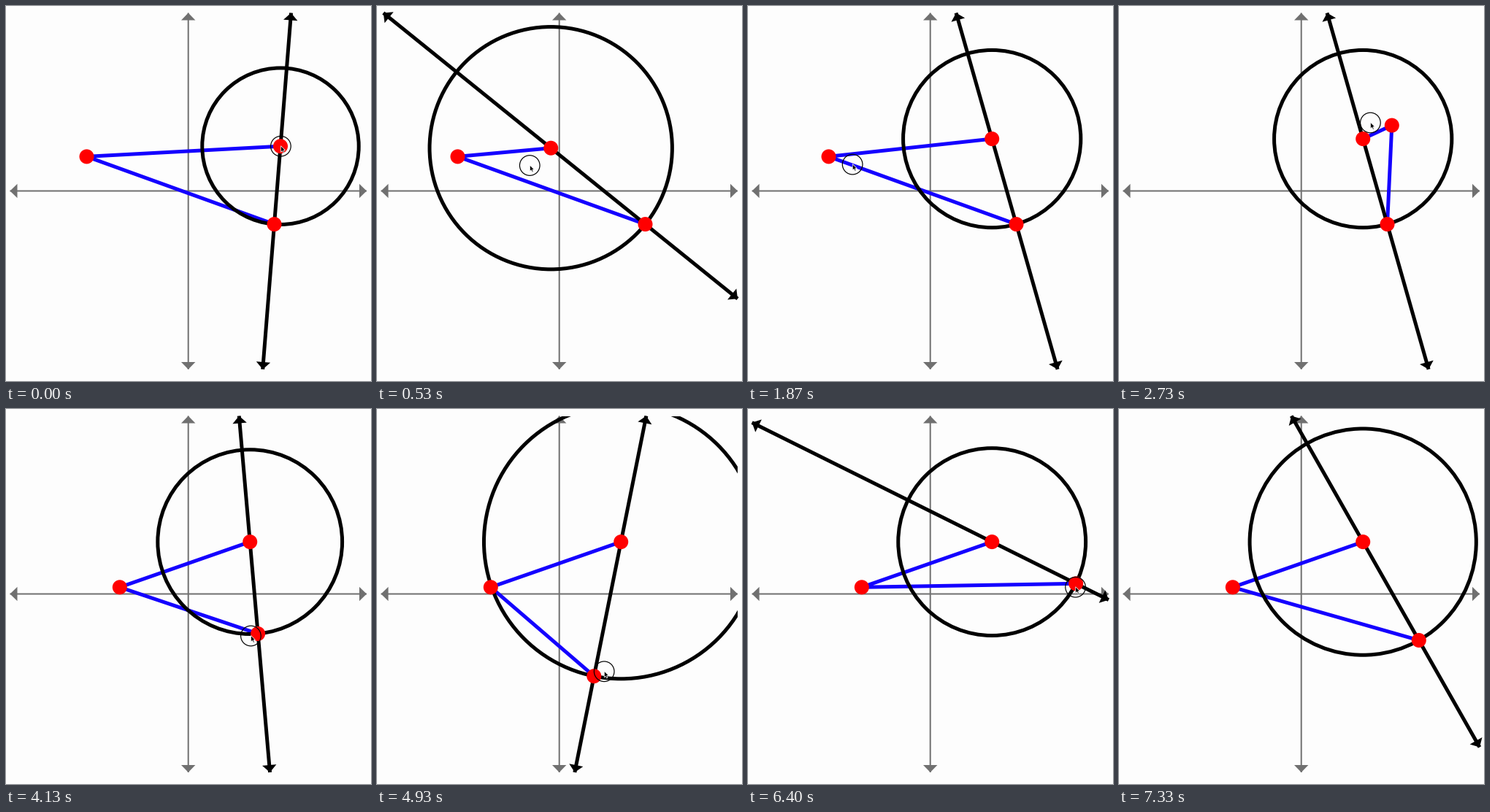
Animation of 500x514 px, one loop 7990 ms. Source, as a matplotlib script:

```python
import numpy as np
import matplotlib.pyplot as plt
from matplotlib.animation import FuncAnimation
from matplotlib.patches import Circle, Polygon, Rectangle

W, H, DPI = 500, 514, 100
LOOP_MS, FRAMES = 7990, 120
HIDE_AT = 110
LEFT, RIGHT, TOP, BOTTOM = 5.5, 494, 9.5, 498
ORIGIN = np.array([249.7, 253.5])
GREY, BLUE, RED, PAPER = "#707070", "#1400ff", "#ff0000", "#fdfdfd"

CENTER_DRAG, VERTEX_DRAG, RIM_DRAG = (2, 22), (27, 47), (54, 108)


class Hop:
    """Pointer move ending at (x, y): a straight run plus an elliptic detour."""

    def __init__(self, frame, x, y, bulge=(0, 0), spin=0.0):
        self.frame = frame
        self.end = np.array([x, y], float)
        self.bulge = np.array(bulge, float)
        self.swing = spin * np.array([-self.bulge[1], self.bulge[0]])

    def at(self, start, u):
        turn = 2 * np.pi * u
        return (start + (self.end - start) * u
                + self.bulge * (1 - np.cos(turn)) / 2
                + self.swing * np.sin(turn) / 2)


HOPS = [
    Hop(0, 376, 192.2),
    Hop(2, 376, 192.2),
    Hop(14, 342.1, 236.2, (-160, 30), 0.5),
    Hop(15, 346, 216),
    Hop(22, 334.2, 182.1, (-125, 20), 0.5),
    Hop(27, 110.5, 206.4),
    Hop(38, 465, 250, (0, 85)),
    Hop(40, 373.8, 163.6, (25, -10)),
    Hop(41, 344, 160),
    Hop(47, 155.8, 244.3, (-30, 150), 0.5),
    Hop(54, 367.5, 299.1),
    Hop(61, 345.1, 308, (40, 18), 0.5),
    Hop(62, 335, 311),
    Hop(68, 238, 331),
    Hop(69, 238, 331),
    Hop(80, 218, 338, (85, 20), 0.5),
    Hop(83, 239.1, 164.2, (-35, 0)),
    Hop(84, 239.8, 161),
    Hop(95, 449.2, 239.3, (20, -110), -0.5),
    Hop(96, 448.2, 244.2),
    Hop(104, 413, 311),
    Hop(108, 410.8, 317),
]


def pointer(t):
    for a, b in zip(HOPS, HOPS[1:]):
        if t <= b.frame:
            return b.at(a.end, (t - a.frame) / (b.frame - a.frame))
    return HOPS[-1].end


def dragged(frame, drag):
    """A dragged point trails the pointer by one frame."""
    return pointer(np.clip(frame - 1, *drag))


def line_ends(p, direction):
    """Where the line through p leaves the plot box."""
    ends = []
    for d in (direction, -direction):
        reach = []
        if abs(d[0]) > 1e-9:
            reach.append(((RIGHT if d[0] > 0 else LEFT) - p[0]) / d[0])
        if abs(d[1]) > 1e-9:
            reach.append(((BOTTOM if d[1] > 0 else TOP) - p[1]) / d[1])
        ends.append(p + d * min(reach))
    return ends


def arrowhead(tip, direction, length=10, half=9.7):
    d = direction / np.hypot(*direction)
    base = tip - d * length
    side = np.array([-d[1], d[0]]) * half
    return np.array([tip, base + side, base - side])


def px(width):
    return width * 72 / DPI


fig = plt.figure(figsize=(W / DPI, H / DPI), dpi=DPI, facecolor=PAPER)
ax = fig.add_axes([0, 0, 1, 1])
ax.set_xlim(0, W)
ax.set_ylim(H, 0)
ax.axis("off")


def stroke(color, width, z):
    return ax.plot([], [], color=color, lw=px(width), zorder=z, snap=False,
                   solid_capstyle="butt", solid_joinstyle="round")[0]


def head(color, z):
    return ax.add_patch(Polygon(np.zeros((3, 2)), fc=color, ec="none", zorder=z))


def place_arrow(line, heads, p, d):
    ends = line_ends(p, d)
    line.set_data(*np.array(ends).T)
    for tip, tip_head, sign in zip(ends, heads, (1, -1)):
        tip_head.set_xy(arrowhead(tip, sign * d))


for axis in np.eye(2):
    place_arrow(stroke(GREY, 2, 1), [head(GREY, 1), head(GREY, 1)], ORIGIN, axis)

sides = stroke(BLUE, 5, 2)
ring = ax.add_patch(Circle((0, 0), 1, fill=False, ec="black", lw=px(5), zorder=3))
ring.set_clip_path(Rectangle((LEFT, TOP), RIGHT - LEFT, BOTTOM - TOP,
                             transform=ax.transData))
secant = stroke("black", 5, 4)
tips = [head("black", 4), head("black", 4)]
dots = [ax.add_patch(Circle((0, 0), 10, fc=RED, ec="none", zorder=5))
        for _ in range(3)]
halo = ax.add_patch(Circle((0, 0), 13.8, fill=False, ec="black",
                           lw=px(1.2), zorder=6))
ARROW = np.array([(0, 0), (0, 8.6), (2, 6.8), (3.4, 9.8), (4.8, 9.1),
                  (3.5, 6.2), (6, 6)])
arrow = ax.add_patch(Polygon(ARROW, fc="black", ec="white", lw=px(0.7), zorder=7))


def update(frame):
    center = dragged(frame, CENTER_DRAG)
    vertex = dragged(frame, VERTEX_DRAG)
    rim = dragged(frame, RIM_DRAG)

    sides.set_data(*np.array([center, vertex, rim]).T)
    ring.center = center
    ring.radius = np.hypot(*(rim - center))
    place_arrow(secant, tips, center, rim - center)
    for dot, p in zip(dots, (center, vertex, rim)):
        dot.center = p

    spot = pointer(frame)
    halo.center = spot + (0.4, 0)
    arrow.set_xy(spot + ARROW + (0.5, -0.5))
    for part in (halo, arrow):
        part.set_visible(frame < HIDE_AT)
    return [sides, ring, secant, *tips, *dots, halo, arrow]


anim = FuncAnimation(fig, update, frames=FRAMES, interval=LOOP_MS / FRAMES,
                     repeat=True, repeat_delay=0, blit=False)
plt.show()
```
